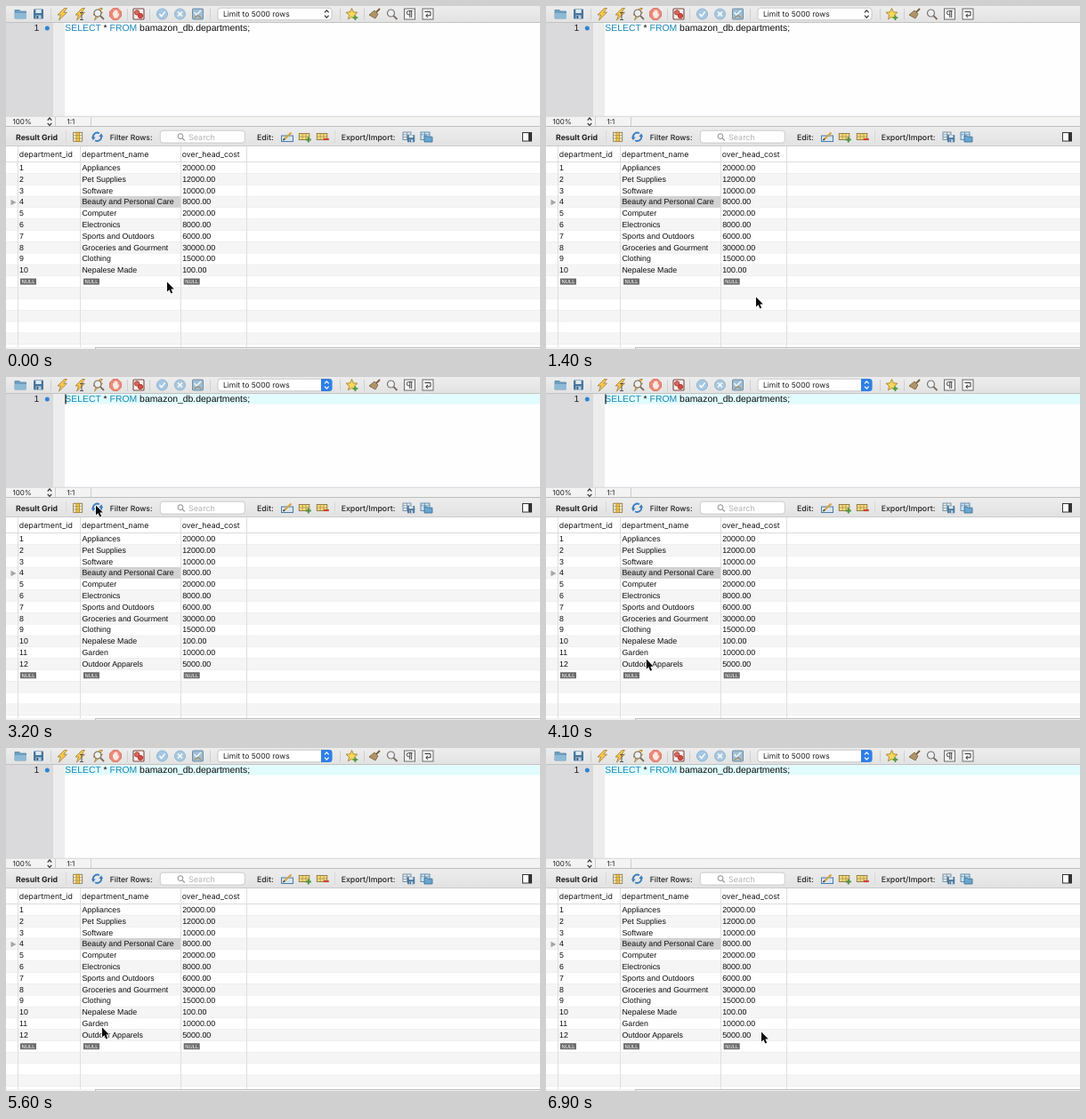
These frames come from a looping animation (600 by 386 pixels, 7000 ms). An HTML page:

```html
<!DOCTYPE html>
<html lang="en">
<head>
<meta charset="utf-8">
<title>Result grid refresh</title>
<style>
html, body { margin: 0; width: 100%; height: 100%; overflow: hidden; background: #fff; }
svg { display: block; width: 100vw; height: 100vh; }
text { font-family: "Liberation Sans", Arial, sans-serif; text-rendering: geometricPrecision; white-space: pre; }
.ui { font-family: Inter, sans-serif; }
.label { font-weight: 500; }
.title { font-weight: 700; }
</style>
</head>
<body>
<svg id="stage" viewBox="0 0 600 386" xmlns="http://www.w3.org/2000/svg"></svg>
<script>
const LOOP = 7000, FOCUS = 2700, REFRESH = 3000;
const ROW_TOP = 175.6, ROW_H = 12.82;
const stage = document.getElementById('stage');

const rect = (x, y, w, h, fill, more = '') =>
  `<rect x="${x}" y="${y}" width="${w}" height="${h}" fill="${fill}" ${more}/>`;
const path = (d, fill, stroke = 'none', w = 1, more = '') =>
  `<path d="${d}" fill="${fill}" stroke="${stroke}" stroke-width="${w}" ${more}/>`;
const circle = (x, y, r, fill, stroke = 'none', w = 1) =>
  `<circle cx="${x}" cy="${y}" r="${r}" fill="${fill}" stroke="${stroke}" stroke-width="${w}"/>`;
const text = (x, y, size, str, fill = '#0c0c0c', more = '') =>
  `<text x="${x}" y="${y}" font-size="${size}" fill="${fill}" ${more}>${str}</text>`;
const ui = (x, y, size, str, fill = '#1c1c1c', kind = '') =>
  text(x, y, size, str, fill, `class="ui ${kind}"`);
const group = (x, y, body, id = '') =>
  `<g ${id && `id="${id}"`} transform="translate(${x} ${y})">${body}</g>`;
const vline = (x, y, h, color) => rect(x, y, 1, h, color);

const bolt = path('M2.5 -6.5L-5 1H-1.5L-3.5 7L5.5 -1.8H1.8L5.5 -6.5Z', '#f6c84c', '#a07a3c', .8);
const lens = (r, color) =>
  path(`M${r * .7} ${r * .7}L${r + 3} ${r + 3}`, 'none', '#7a6a5a', 1.8) + circle(0, 0, r, '#eceeef', color, 1.2);
const floppy = rect(-5.5, -5.5, 11, 11, '#47759b', 'rx="1"') + rect(-3.2, -5, 6.4, 4, '#dce8f1') +
  rect(-3, 1.4, 6, 4, '#b9cfdf') + rect(-2, 2, 1.8, 3, '#315673');
const stepper = color =>
  path('M-2.3 -1.6L0 -4.2L2.3 -1.6M-2.3 1.6L0 4.2L2.3 1.6', 'none', color, 1.2);
const table = body => rect(-6.5, -3.5, 11.5, 7, body, 'stroke="#8a7440" stroke-width=".9"') +
  path('M-6.5 0H5M-2.6 -3.5V3.5M1.2 -3.5V3.5', 'none', '#a08a50', .7);

function toolbar() {
  const box = rect(-6, -6, 12, 12, '#fafafa', 'stroke="#6b6b6b" stroke-width="1"');
  return rect(0, 0, 600, 19, 'url(#bar)') + rect(0, 18.3, 600, .9, '#b5b5b5') +
    [50, 136, 161, 229, 375, 402].map(x => vline(x, 3, 13, '#cfcfcf')).join('') +
    group(16.5, 9, path('M-6.5 -4.5H-1.5L0 -3H6V5H-6.5Z', '#6d9fc2', '#5a87a6', .8) +
      path('M-6.5 5V-1H6.5V5Z', '#8db9d6')) +
    group(36.5, 9, floppy) +
    group(63, 9, bolt) +
    group(83, 9, bolt + path('M2 -1V6M0 -1.5H4M0 6.5H4', 'none', '#555', 1)) +
    group(103, 9, bolt + group(0, -1, lens(4, '#7e705c'))) +
    group(123, 9, path('M-2.7 -6.5H2.7L6.5 -2.7V2.7L2.7 6.5H-2.7L-6.5 2.7V-2.7Z', '#ec8a78', '#d46a58', .8) +
      path('M-3 1V-2H-1.6V-4H-.2V-4.6H1.2V-3.8H2.6V0L4 -1V1.2L2 4.5H-1.4Z', '#fbe9e4')) +
    group(149, 9, rect(-6, -6, 12, 12, '#f6efee', 'rx="1" stroke="#7a4640" stroke-width="1.1"') +
      circle(-1.8, -1.6, 2.7, '#d7695f', '#a83a34', .9) + circle(2, 2, 2.7, '#d84a40', '#a83a34', .9)) +
    group(175.5, 9, circle(0, 0, 6, '#a5c7e2', '#8fb4d2') +
      path('M-3 0L-.8 2.6L3.2 -2.6', 'none', '#fff', 1.5)) +
    group(195.5, 9, circle(0, 0, 6, '#a9c8de', '#93b5cf') +
      path('M-2.5 -2.5L2.5 2.5M2.5 -2.5L-2.5 2.5', 'none', '#fff', 1.5)) +
    group(215.5, 9, rect(-6, -6, 12, 12, '#9fbdd3', 'rx="1" stroke="#6f8fa6"') +
      path('M-4 -2L-1.5 1L3.5 -4', 'none', '#eef5fa', 1.6) +
      path('M-4 4.5L0 1.5L4 4.5', 'none', '#a58c62', 1.3)) +
    rect(238, 2.2, 128, 13.6, '#fff', 'rx="3" stroke="#bdbdbd" stroke-width=".8"') +
    ui(244, 12.1, 8.5, 'Limit to 5000 rows') +
    `<g id="active">${path('M354 2H363Q366.5 2 366.5 5V13Q366.5 16 363 16H354Z', '#2f7fe6')}${group(360.3, 9, stepper('#fff'))}</g>` +
    `<g id="idle">${group(360.3, 9, stepper('#333'))}</g>` +
    group(388.5, 9, path('M0 -6.5L1.8 -2.2L6.4 -1.8L2.9 1.2L4 5.8L0 3.3L-4 5.8L-2.9 1.2L-6.4 -1.8L-1.8 -2.2Z', '#f7d75c', '#a8842a', .9) +
      path('M4 1.5V7M1.2 4.2H6.8', 'none', '#4c9a3c', 1.8)) +
    group(414, 9, path('M6 -6L2 -2', 'none', '#7b5a35', 1.8) +
      path('M0 -4L4 0L1 5L-6 1Z', '#b09468', '#7d6540', .9)) +
    group(432.5, 8, lens(4, '#777')) +
    group(453.5, 9, box + path('M3 -3.5H-1A2 2 0 0 0 -1 .8H.3M.3 -3.5V4M2.2 -3.5V4', 'none', '#333', .9)) +
    group(474, 9, box + path('M-3.5 -2.5H3V1.8H-2M0 -.2L-2.2 1.8L0 3.8', 'none', '#333', 1));
}

function editor() {
  return rect(0, 19, 53, 105, '#dadadc') + rect(53, 19, 13, 105, '#ededee') +
    rect(66, 19, 534, 105, '#fefdff') + rect(66, 19.2, 534, 11.3, '#e2fbfd', 'id="line"') +
    text(31.5, 28, 10.4, '1', '#222') + circle(46.3, 25, 2.5, '#2f83d4') +
    text(66.3, 28, 10.43,
      '<tspan fill="#1688b5">SELECT</tspan> * <tspan fill="#1688b5">FROM</tspan> bamazon_db.departments;') +
    rect(66.4, 19.4, 1.2, 11, '#111', 'id="caret"') +
    rect(0, 124, 600, 12, '#f3f3f3') + rect(0, 123.8, 600, .8, '#cfcfcf') +
    ui(7.5, 133, 8, '100%') + group(49, 130.2, stepper('#333')) +
    [55, 95].map(x => vline(x, 125, 10, '#cdcdcd')).join('') +
    ui(68.5, 133, 8, '1:1');
}

function gridBar() {
  const label = (x, size, str) => ui(x, 150.5, size, str, '#222', 'label');
  const turn = path('M-4.6 1A4.7 4.7 0 0 1 2.4 -4', 'none', '#3d7fc0', 1.9) +
    path('M-6.6 .2H-1.8L-4.6 4Z', '#3d7fc0');
  return rect(0, 136, 600, 22, 'url(#bar)') + rect(0, 135, 600, 1, '#bdbdbd') + rect(0, 157.3, 600, .9, '#c2c2c2') +
    ui(11, 150.5, 8.75, 'Result Grid', '#222', 'title') +
    vline(67, 140, 14, '#d9d9d9') +
    group(80.7, 147.3, rect(-5, -5, 10, 10, '#f4f1e4', 'stroke="#8a7a4a" stroke-width=".9"') +
      rect(-1.8, -5, 3.8, 10, '#f4c93c', 'stroke="#a8842a" stroke-width=".8"') +
      path('M-5 -1.7H5M-5 1.7H5', 'none', '#9a8a5a', .7)) +
    group(102.5, 147.3, turn + `<g transform="rotate(180)">${turn}</g>`) +
    label(116.7, 8.6, 'Filter Rows:') +
    rect(173.3, 140.2, 95, 13.8, '#fff', 'rx="3" stroke="#c2c2c2" stroke-width=".8"') +
    circle(196, 146.6, 2.9, 'none', '#8a8a8a', 1) + path('M198.2 148.8L200.8 151.4', 'none', '#8a8a8a', 1.2) +
    ui(205, 150.5, 9, 'Search', '#b3b3b3') +
    label(282, 8.8, 'Edit:') +
    group(316, 147.5, rect(-6.5, -1.5, 13, 6.5, '#d6e4f0', 'stroke="#4b7ca8" stroke-width="1"') +
      path('M-3.5 2.5L4.5 -5', 'none', '#d9a441', 2.2) + path('M-4.6 3.6L-2.8 1.9', 'none', '#333', 1.4)) +
    group(335.8, 147, table('#f7dc7a') + path('M4 .5V6.5M1 3.5H7', 'none', '#4d9440', 1.9)) +
    group(355.8, 147, table('#f7dc7a') + path('M1 3H7', 'none', '#c94335', 2.2)) +
    vline(369, 140, 14, '#d9d9d9') +
    label(376.7, 8.75, 'Export/Import:') +
    group(452.5, 147, rect(-6.5, -5, 9, 8.5, '#e3ebf0', 'stroke="#6f8ca0" stroke-width=".9"') +
      path('M-6.5 -2.2H2.5M-6.5 .6H2.5M-2 -5V3.5', 'none', '#6f8ca0', .7) +
      group(2.6, 2, `<g transform="scale(.75)">${floppy}</g>`)) +
    group(472.5, 147, rect(-6.5, -5, 10, 8.5, '#d2e3ef', 'stroke="#5484a8" stroke-width=".9"') +
      path('M-6.5 -2.2H3.5M-2 -5V3.5', 'none', '#5484a8', .7) +
      path('M-2.5 -1H.5L1.5 .2H6.5V6H-2.5Z', '#6aa5cf', '#346c94', .8)) +
    rect(580.5, 142.5, 10, 9.5, '#fff', 'stroke="#333" stroke-width="1"') + rect(587, 142.5, 3.5, 9.5, '#333');
}

const names = ['Appliances', 'Pet Supplies', 'Software', 'Beauty and Personal Care', 'Computer', 'Electronics',
  'Sports and Outdoors', 'Groceries and Gourment', 'Clothing', 'Nepalese Made', 'Garden', 'Outdoor Apparels'];
const costs = [20000, 12000, 10000, 8000, 20000, 8000, 6000, 30000, 15000, 100, 10000, 5000];

function cells(i) {
  const y = ROW_TOP + i * ROW_H + 9.3;
  return text(15, y, 8.8, i + 1) + text(85.5, y, 8.8, names[i]) + text(198.2, y, 8.9, costs[i].toFixed(2));
}

function nulls(i, id) {
  const y = ROW_TOP + i * ROW_H + 2.8;
  const badge = x => rect(x, y, 18, 7, '#6c6c6c') +
    text(x + 9, y + 5.6, 5.8, 'NULL', '#fff', 'text-anchor="middle"');
  return `<g id="${id}">${[16, 87, 199.7].map(badge).join('')}</g>`;
}

function grid() {
  let s = rect(0, 158, 600, 228, '#fff');
  for (let i = 1; i < 17; i++) {
    const y = ROW_TOP + i * ROW_H;
    s += (i % 2 ? rect(0, y, 600, ROW_H, '#f5f5f5') : '') + rect(0, y - .3, 600, .6, '#e9e9e9');
  }
  s += rect(0, 175, 600, .8, '#d4d4d4') + rect(84, ROW_TOP + 3 * ROW_H, 112, ROW_H, '#d2d2d2') +
    [13, 83, 196, 270].map(x => vline(x, 158, 226, '#dfdfdf')).join('') +
    path('M5.5 217.8L11.5 221L5.5 224.2Z', '#a5a5a5') +
    ui(14.8, 170.2, 8.8, 'department_id') + ui(85, 170.2, 8.8, 'department_name') +
    ui(197.8, 170.2, 8.75, 'over_head_cost');
  const rows = names.map((_, i) => cells(i));
  s += rows.slice(0, 10).join('') + nulls(10, 'before') +
    `<g id="after">${rows.slice(10).join('')}${nulls(12, 'end')}</g>`;
  return s + rect(0, 384, 600, 2, '#f3f3f3') + rect(101, 384, 499, 1, '#bcbcbc') + vline(100, 384, 2, '#bcbcbc');
}

stage.innerHTML = `<defs><linearGradient id="bar" x1="0" y1="0" x2="0" y2="1">
  <stop stop-color="#ededed"/><stop offset="1" stop-color="#e2e2e2"/></linearGradient></defs>` +
  toolbar() + editor() + gridBar() + grid() +
  group(0, 0, path('M0 .5V11.6L2.5 9.3L4.4 13.6L6.2 12.8L4.4 8.6H7.8Z', '#0a0a0a', '#fff', 1.2,
    'paint-order="stroke" stroke-linejoin="round"'), 'pointer');

// time, x, y of the pointer tip
const keys = [
  [0, 181, 310], [800, 206, 315], [1400, 236, 327], [1600, 230, 330], [1750, 230, 330],
  [2400, 101, 142], [2700, 101, 143], [3200, 101, 144], [3300, 101, 144], [3700, 114, 310],
  [3850, 114, 310], [4300, 112, 322], [4700, 108.5, 311], [5150, 111, 321], [5600, 108, 314],
  [6000, 118, 325], [6900, 242, 319], [LOOP, 242, 319]
];
const ease = u => u * u * (3 - 2 * u);

function pointerAt(t) {
  const n = keys.findIndex(k => k[0] > t);
  const a = keys[n - 1], b = keys[n], u = ease((t - a[0]) / (b[0] - a[0]));
  return [a[1] + (b[1] - a[1]) * u, a[2] + (b[2] - a[2]) * u];
}

const el = id => document.getElementById(id);
const show = (id, on) => el(id).setAttribute('visibility', on ? 'visible' : 'hidden');

function draw(t) {
  const focused = t >= FOCUS, fresh = t >= REFRESH;
  show('active', focused);
  show('idle', !focused);
  show('line', focused);
  show('caret', focused && t % 1000 < 500);
  show('before', !fresh);
  show('after', fresh);
  el('pointer').setAttribute('transform', `translate(${pointerAt(t).join(' ')})`);
}

const start = performance.now();
function frame() {
  draw((performance.now() - start) % LOOP);
  requestAnimationFrame(frame);
}
frame();
</script>
</body>
</html>
```
